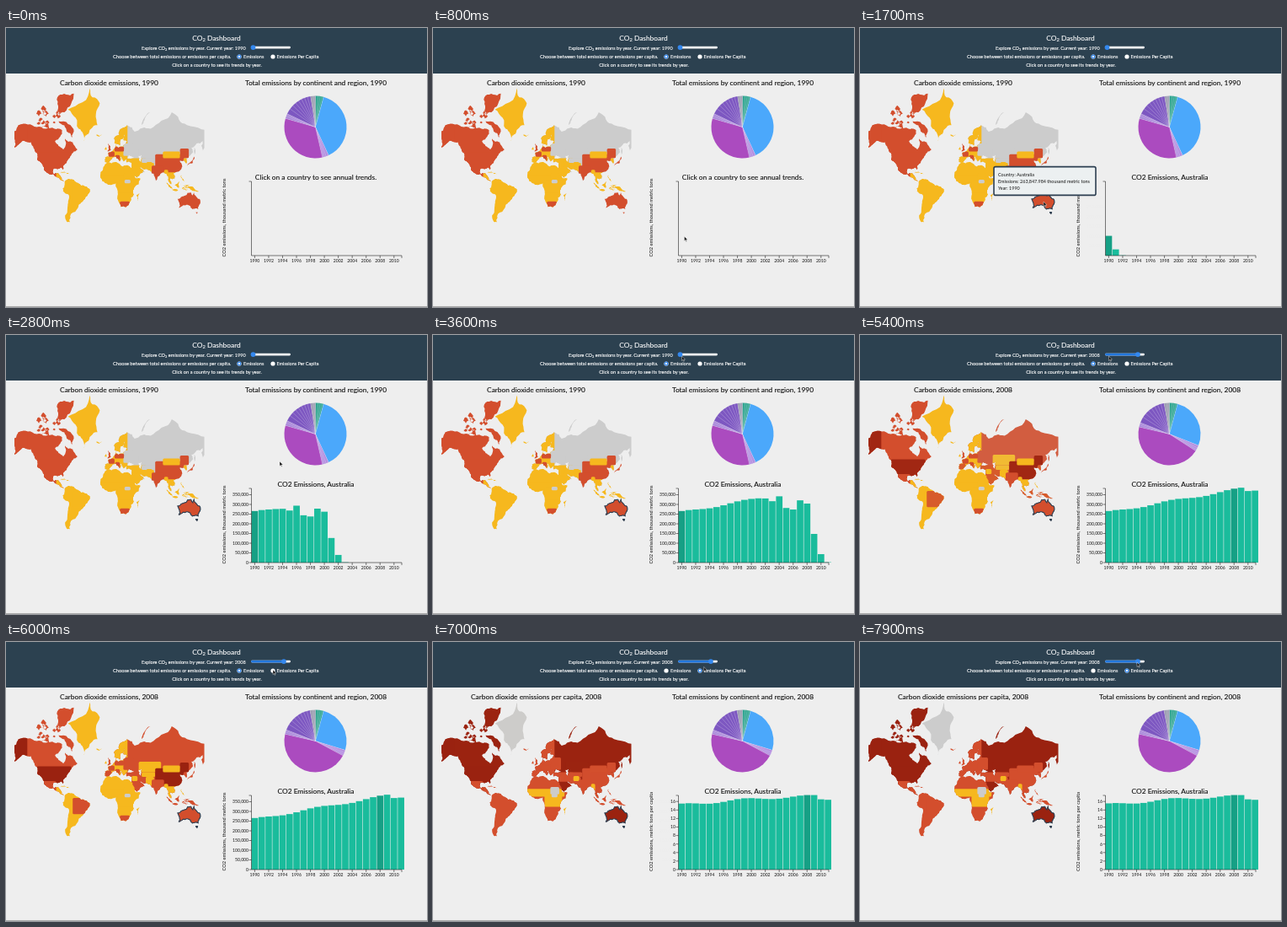
Animation of 500x331 px, one loop 8 s. Source, as an HTML page:

```html
<!DOCTYPE html>
<html lang="en">
<meta charset="utf-8">
<title>CO2 Dashboard</title>
<style>
html, body { margin: 0; width: 100%; height: 100%; overflow: hidden; background: #eee }
svg { display: block; width: 500px; height: 331px; font: 5.7px Lato, sans-serif; fill: #111 }
.big { font-size: 8.4px; stroke: #111; stroke-width: .12 }
.mid { text-anchor: middle }
.head, .head .big { fill: #fff; stroke: #fff; stroke-width: .12 }
.tick { font-size: 5.1px }
.line { stroke: #222; stroke-width: .6; fill: none }
</style>
<svg viewBox="0 0 500 331">
  <defs id="defs"><clipPath id="frame"><path d="M10 71H235.5V236H10Z"/></clipPath></defs>
  <path fill="#2c4150" d="M0 0H500V54H0Z"/>
  <path fill="#aaa" d="M0 330H500V331H0Z"/>
  <g class="head">
    <text class="big mid" x="250" y="14.5">CO<tspan font-size="5.8" dy="1.5">2</tspan><tspan dy="-1.5"> Dashboard</tspan></text>
    <text x="161" y="25.5" font-size="5.6">Explore CO<tspan font-size="4" dy="1">2</tspan><tspan dy="-1"> emissions by year. Current year: </tspan><tspan id="now"></tspan></text>
    <text x="127" y="36">Choose between total emissions or emissions per capita.</text>
    <text x="282" y="36">Emissions</text>
    <text x="321.5" y="36" font-size="5.5">Emissions Per Capita</text>
    <text class="mid" x="250.5" y="45.5">Click on a country to see its trends by year.</text>
  </g>
  <rect x="291" y="21.8" width="47" height="2.6" rx="1.3" fill="#f4f4f4"/>
  <rect id="fill" x="291" y="21.8" height="2.6" rx="1.3" fill="#2277dd"/>
  <circle id="thumb" cy="23.1" r="2.9" fill="#3488ee"/>
  <g id="radios"></g>
  <text id="mapTitle" class="big mid" x="122.5" y="68"></text>
  <text id="pieTitle" class="big mid" x="368" y="68"></text>
  <text id="barTitle" class="big mid" x="368" y="179.5"></text>
  <g id="map" clip-path="url(#frame)" stroke-linejoin="round"></g>
  <g id="pie" transform="translate(367.5 117.5)"></g>
  <g id="bars"></g>
  <path class="line" d="M288.5 182H291.5V270H470V273"/>
  <g id="years"></g><g id="total"></g><g id="capita"></g>
  <text id="unit" class="mid" transform="translate(261 225) rotate(-90)"></text>
  <g id="tip">
    <rect x="159" y="164.6" width="121" height="33.8" rx="2" fill="#ecf0f1" stroke="#2c3e50" stroke-width="1.6"/>
    <g font-size="5.45">
      <text x="164" y="176">Country: Australia</text>
      <text x="164" y="184">Emissions: 263,847.984 thousand metric tons</text>
      <text x="164" y="192">Year: 1990</text>
    </g>
  </g>
  <path id="cursor" d="M0 0V5.5L1.3 4.3 2.2 6.3 3 6 2.1 4H3.9Z" stroke="#fff" stroke-width=".4"/>
</svg>
<script>
const LOOP = 8000, CLICK = 1475, DRAG = 3650, YEAR_MS = 95, CAPITA = 6150;
const $ = id => document.getElementById(id);
const clamp = v => Math.max(0, Math.min(1, v));
const mix = (a, b, p) => a + (b - a) * p;
const span = (t, from, to) => clamp((t - from) / (to - from));
const cubic = p => p < .5 ? 4 * p ** 3 : 1 - 4 * (1 - p) ** 3;
const smooth = p => p * p * (3 - 2 * p);

function bounce(p) {
  if (p < 4 / 11) return 7.5625 * p * p;
  if (p < 8 / 11) return 7.5625 * (p - 6 / 11) ** 2 + .75;
  if (p < 10 / 11) return 7.5625 * (p - 9 / 11) ** 2 + .9375;
  return 7.5625 * (p - 21 / 22) ** 2 + .984375;
}
let seed = 7;
const random = () => (seed = seed * 16807 % 2147483647) / 2147483647;

function set(el, attrs) {
  for (const k in attrs) el.setAttribute(k, attrs[k]);
  return el;
}
function add(parent, tag, attrs, text = '') {
  const el = document.createElementNS('http://www.w3.org/2000/svg', tag);
  set(el, attrs).textContent = text;
  parent.append(el);
  return el;
}

// Map: Mercator key points in degrees, joined by a seeded rough coastline.
// Shades stand for total 1990, total 2008 and per capita 2008.
const SHADES = { y: [246, 184, 30], r: [211, 78, 45], d: [154, 34, 16], g: [204, 204, 204] };
const areas = [];
const project = (lon, lat) =>
  [124 + lon * .7, 187 - 40.1 * Math.log(Math.tan(Math.PI / 4 + lat * Math.PI / 360))];

function roughen(a, b, depth) {
  if (!depth) return [b];
  const shift = (random() - .5) * .36;
  const m = [(a[0] + b[0]) / 2 + (b[1] - a[1]) * shift, (a[1] + b[1]) / 2 - (b[0] - a[0]) * shift];
  return [...roughen(a, m, depth - 1), ...roughen(m, b, depth - 1)];
}
function coast(ring) {
  const points = ring.split(' ').map(p => project(...p.split(',').map(Number)));
  const rough = points.flatMap((p, i) => roughen(p, points[(i + 1) % points.length], 3));
  return 'M' + rough.map(p => p.map(v => v.toFixed(1)).join(' ')).join('L') + 'Z';
}
function shade(el, code) {
  areas.push({ el, shades: [...code].map(c => SHADES[c]) });
  return el;
}
// Countries are boxes (west, south, east, north) cut out by the coast.
function land(code, rings, countries = []) {
  const d = rings.split('|').map(coast).join('');
  const el = shade(add($('map'), 'path', { d, 'fill-rule': 'evenodd' }), code);
  const id = 'land' + areas.length;
  add(add($('defs'), 'clipPath', { id }), 'path', { d, 'clip-rule': 'evenodd' });
  const inside = add($('map'), 'g', { 'clip-path': `url(#${id})` });
  for (const [box, w, s, e, n] of countries) {
    const [x, y] = project(w, n), [right, bottom] = project(e, s);
    shade(add(inside, 'rect', { x, y, width: right - x, height: bottom - y, rx: 1.5 }), box);
  }
  return el;
}
function islands(code, count, w, s, e, n) {
  const ring = () => {
    const lon = mix(w, e, random()), lat = mix(s, n, random()), size = 2 + 3 * random();
    return `${lon - size},${lat} ${lon},${lat + size / 4} ${lon + size},${lat} ${lon},${lat - size / 4}`;
  };
  land(code, Array.from({ length: count }, ring).join('|'));
}

land('rrd', '-168,66 -156,71 -125,70 -95,69 -82,68 -94,60 -80,52 -77,62 -64,59 -56,52 -66,47 -70,42 -76,35 -81,26 -84,30 -97,27 -96,19 -90,21 -83,10 -78,8 -92,15 -105,20 -113,30 -124,40 -124,48 -135,59 -150,60 -164,54 -162,61', [
  ['rdd', -126, 24, -66, 49], ['rdd', -170, 50, -141, 73], ['rrr', -118, 14, -92, 30], ['yyr', -92, 5, -76, 22]]);
land('rrd', '-65,63 -62,67 -88,73 -74,67|-90,77 -78,77 -62,82.5 -88,82|-117,70 -104,69 -106,73');
islands('rrd', 16, -122, 71, -84, 79);
land('yyg', '-72,78 -35,83.6 -18,80 -22,71 -40,65 -45,60 -54,69');
land('yyr', '-77,8 -62,10 -50,0 -35,-6 -39,-17 -48,-27 -57,-37 -65,-42 -69,-53 -74,-52 -73,-37 -70,-18 -81,-5', [
  ['yrr', -64, -24, -34, 3]]);
land('yyr', '-24,65 -14,65 -19,63.5|-85,22 -74,20 -68,19|120,18 126,7 122,10|-10,52 -6,52 -7,55');
land('grd', '-9,37 -9,43 -2,44 -4,48 8,54 9,57 13,54 21,55 28,60 22,61 24,65 17,61 16,56 7,58 6,62 18,69 28,71 41,67 68,69 104,77 130,71 180,69 180,63 163,58 157,51 157,60 137,54 140,49 129,42 129,35 125,39 118,39 122,31 115,23 107,20 109,12 101,12 103,2 98,9 98,16 91,22 80,14 77,8 73,20 67,25 57,26 50,30 56,25 58,22 45,13 35,28 36,36 27,37 28,41 22,38 15,45 18,40 16,38 9,44 0,39 -5,36|28,42 31,46 40,43|48,45 53,46 52,37 49,39', [
  ['yyr', -12, 34, 29, 72], ['grr', 22, 45, 40, 58], ['yrr', -12, 34, 2, 44],
  ['rrr', -4, 44, 7, 50], ['rrr', 7, 50, 23, 55], ['rrr', 8, 36, 16, 46],
  ['yrr', 26, 24, 61, 42], ['yyr', 36, 30, 46, 37], ['yrd', 34, 10, 55, 29],
  ['gyd', 48, 42, 86, 54], ['gyr', 53, 36, 76, 42], ['yyr', 60, 23, 74, 36], ['yyy', 61, 30, 71, 37],
  ['yyr', 90, 0, 111, 24], ['rdr', 76, 22, 125, 47], ['rdr', 118, 42, 133, 53],
  ['rrr', 70, 6, 91, 32], ['yyy', 91, 15, 98, 26], ['yyr', 89, 42, 118, 50], ['yrr', 124, 33, 131, 42]]);
land('grd', '53,71 68,77 56,72|142,46 144,49 142,54');
land('rrr', '-5,50 1,52 -4,58|130,31 140,36 143,44 139,39 131,34');
land('yrr', '95,5 106,-5 101,-3|105,-6 115,-8 106,-8|109,1 117,7 116,-4|131,-1 141,-3 150,-10 138,-8');
islands('yrr', 6, 118, -8, 130, 1);
land('yyr', '-17,15 -16,23 -6,36 10,37 20,31 33,31 43,12 51,12 40,-4 40,-15 33,-27 27,-34 18,-34 12,-17 9,4 -8,4', [
  ['yyy', -18, 5, 46, 18], ['yyy', 12, -12, 42, 8], ['yyg', 22, 9, 37, 21], ['ggg', 24, 4, 34, 10], ['rrr', 16, -36, 33, -26]]);
land('yyy', '44,-17 50,-13 46,-25');
const australia = land('rrd', '114,-22 122,-18 131,-12 137,-12 140,-17 142,-11 146,-19 153,-27 149,-37 139,-37 131,-31 116,-35|145,-41 148,-41 147,-43');

// Pie groups: colour, degrees in 1990 and in 2008, number of slices
const groups = [
  ['#2fa590', 15, 15, 4], ['#4ba8fb', 140, 92, 1], ['#b48fe0', 12, 11, 3], ['#ab4bbf', 119, 165, 1],
  ['#a583d8', 9, 8, 3], ['#7d57c1', 56, 59, 8], ['#9a9baf', 9, 10, 3]
].map(([fill, from, to, n]) => ({
  from, to, n,
  area: add($('pie'), 'path', { fill }),
  cuts: add($('pie'), 'path', { stroke: '#fff', 'stroke-width': .5, opacity: .45 })
}));
function rim(deg) {
  const a = deg * Math.PI / 180;
  return `${37 * Math.sin(a)} ${-37 * Math.cos(a)}`;
}
function drawPie(p) {
  let start = 0;
  for (const g of groups) {
    const end = start + mix(g.from, g.to, p);
    g.area.setAttribute('d', `M0 0L${rim(start)}A37 37 0 ${+(end - start > 180)} 1 ${rim(end)}Z`);
    let cuts = '';
    for (let i = 0; i < g.n; i++) cuts += `M0 0L${rim(mix(start, end, (i / g.n) ** .8))}`;
    g.cuts.setAttribute('d', cuts);
    start = end;
  }
}

// Bar chart: steady growth with a nine-year ripple and a late dip
const STEP = 8.27;
const tons = i => 260 + 6.4 * i + 6 * Math.cos(i * Math.PI / 4.5) - (i > 19 ? 20 : 0);
const perHead = i => tons(i) / (17.1 * 1.0135 ** i);
const bars = Array.from({ length: 22 }, (_, i) => add($('bars'), 'rect', { x: 291.6 + i * STEP, width: 7.7 }));
for (let i = 0; i <= 20; i += 2) {
  const x = 295.4 + i * STEP;
  add($('years'), 'path', { class: 'line', d: `M${x} 270v3` });
  add($('years'), 'text', { class: 'tick mid', x, y: 278 }, 1990 + i);
}
function yTick(group, y, label) {
  add($(group), 'path', { class: 'line', d: `M288.5 ${y}h3` });
  add($(group), 'text', { class: 'tick', x: 288, y: y + 1.8, 'text-anchor': 'end' }, label);
}
for (let i = 0; i < 8; i++) yTick('total', 270 - i * 11.5, (i * 50000).toLocaleString('en-US'));
for (let i = 0; i < 9; i++) yTick('capita', 270 - i * 10.1, i * 2);

const radios = [277, 317].map(cx => {
  add($('radios'), 'circle', { cx, cy: 34, r: 2.6, fill: '#fff' });
  return add($('radios'), 'circle', { cx, cy: 34, r: 1.8, fill: '#fff', stroke: '#3488ee', 'stroke-width': 1.3 });
});

// Cursor moves: departure, arrival, x, y
const moves = [[200, 1150, 218, 206], [1900, 2750, 325, 150], [3000, 3550, 295.5, 25],
  [5450, 5900, 317, 33], [6700, 7400, 329, 24]];
function cursorAt(t) {
  let x = 480, y = 340;
  for (const [from, to, nextX, nextY] of moves) {
    const p = smooth(span(t, from, to));
    x = mix(x, nextX, p);
    y = mix(y, nextY, p);
  }
  return `translate(${x} ${y})`;
}

function draw(t) {
  const index = Math.max(0, Math.min(18, Math.floor((t - DRAG) / YEAR_MS)));
  const year = 1990 + index, capita = t >= CAPITA;
  const later = cubic(span(t, 4400, 5850)), swap = cubic(span(t, CAPITA, CAPITA + 1000));

  $('now').textContent = year;
  $('mapTitle').textContent = `Carbon dioxide emissions${capita ? ' per capita' : ''}, ${year}`;
  $('pieTitle').textContent = `Total emissions by continent and region, ${year}`;
  $('barTitle').textContent = t < CLICK ? 'Click on a country to see annual trends.' : 'CO2 Emissions, Australia';
  $('unit').textContent = 'CO2 emissions, ' + (capita ? 'metric tons per capita' : 'thousand metric tons');

  const x = 293.5 + index / 21 * 42.5;
  $('thumb').setAttribute('cx', x);
  $('fill').setAttribute('width', x - 291);
  radios.forEach((r, i) => r.setAttribute('opacity', +(capita === !!i)));

  for (const { el, shades: [a, b, c] } of areas) {
    const color = a.map((v, i) => Math.round(mix(mix(v, b[i], later), c[i], swap)));
    el.setAttribute('fill', `rgb(${color})`);
  }
  set(australia, { stroke: t > 1150 ? '#2c3e50' : 'none', 'stroke-width': 1.1 });

  drawPie(smooth(span(t, 3700, 5800)));
  bars.forEach((bar, i) => {
    const grow = bounce(clamp((t - CLICK - i * 100) / 1000));
    const height = grow * mix(tons(i) * .23, perHead(i) * 5.05, swap);
    set(bar, { y: 270 - height, height, fill: i === index ? '#16a085' : '#1abc9c' });
  });
  $('total').setAttribute('opacity', cubic(span(t, CLICK + 100, CLICK + 1000)) * (1 - swap));
  $('capita').setAttribute('opacity', swap);
  $('tip').setAttribute('opacity', +(t > 1150 && t < 2150));
  $('cursor').setAttribute('transform', cursorAt(t));
}

let begin;
function tick(now) {
  begin ??= now;
  draw((now - begin) % LOOP);
  requestAnimationFrame(tick);
}
draw(0);
requestAnimationFrame(tick);
</script>
</html>
```
